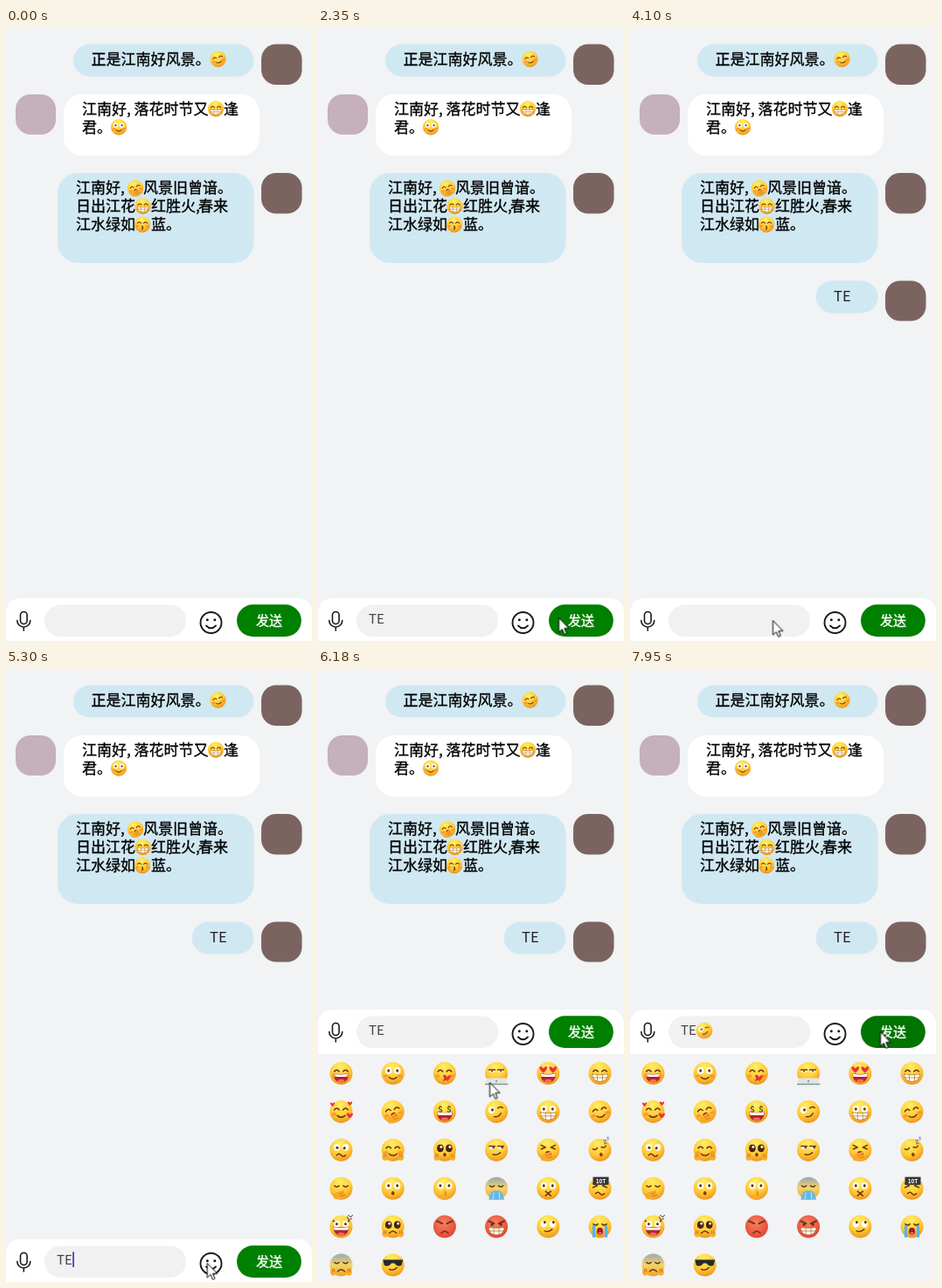
Write an HTML page that moves like this. It is 350 by 702 pixels and loops after 8000 ms.

```html
<!DOCTYPE html>
<html lang="zh">
<head>
<meta charset="utf-8">
<title>Chat</title>
<style>
html, body { margin: 0; width: 100%; height: 100%; overflow: hidden; background: #f1f3f5; }
svg { display: block; }
text { font-family: "Noto Sans CJK SC", "Noto Sans CJK", "Noto Sans", sans-serif; }
.chat text { font-size: 17px; }
.chat .sent text { font-size: 16.5px; fill: #222; }
#lines > text { stroke: #000; stroke-width: .3px; }
.typed text { font-size: 15px; fill: #444; }
.label { font-size: 15px; fill: #fff; stroke: #fff; stroke-width: .4px; }
.mine { fill: #d0e8f2; }
.icon { fill: none; stroke: #1b1b1b; stroke-linecap: round; }

/* One loop is 8 s, so 1% is 80 ms. */
.bar, .one, .two, .picked, .caret, .sent, .button, .grid, .mouse {
  animation-duration: 8s; animation-iteration-count: infinite; animation-timing-function: step-end;
}
.bar { animation-name: lift; }
.one { animation-name: one; }
.two { animation-name: two; }
.picked { animation-name: picked; }
.caret { animation-name: caret; }
.sent { animation-name: sent; }
.button { fill: #008000; animation-name: press; }
.grid { animation-name: zoom; transform-origin: 174.5px 572px; }
.mouse { animation-name: mouse; animation-timing-function: ease-in-out; }

@keyframes lift {
  0% { transform: none; }
  69.625%, 100% { transform: translateY(-263px); }
}
@keyframes one {
  0%, 18.25%, 60.5%, 100% { opacity: 0; }
  15.75%, 57.875% { opacity: 1; }
}
@keyframes two {
  0%, 32% { opacity: 0; }
  18.25%, 60.5%, 100% { opacity: 1; }
}
@keyframes picked {
  0% { opacity: 0; }
  87.25%, 100% { opacity: 1; }
}
@keyframes sent {
  0% { opacity: 0; }
  32%, 100% { opacity: 1; }
}
@keyframes press {
  0%, 33.625% { fill: #008000; }
  31%, 98.25%, 100% { fill: #007300; }
}
@keyframes caret {
  0%, 24.875%, 38.75%, 51.25%, 67.125%, 100% { opacity: 0; transform: none; }
  10.75%, 32%, 45.375%, 54.625% { opacity: 1; transform: none; }
  15.75%, 57.875% { opacity: 1; transform: translateX(9px); }
  18.25%, 60.5% { opacity: 1; transform: translateX(18px); }
}
@keyframes zoom {
  0% { opacity: 0; transform: scale(.9); }
  69.625% { opacity: 0; transform: scale(.9); animation-timing-function: ease-in-out; }
  75.875%, 100% { opacity: 1; transform: none; }
}
@keyframes mouse {
  0% { opacity: 0; transform: translate(150px, 702px); animation-timing-function: step-end; }
  4.875% { opacity: 1; transform: translate(150px, 698px); animation-timing-function: ease-out; }
  8.25%, 20.75% { opacity: 1; transform: translate(133.5px, 676.5px); }
  29.375%, 44.6% { opacity: 1; transform: translate(275.5px, 675.5px); }
  51.25%, 60.5% { opacity: 1; transform: translate(163.5px, 678.5px); }
  67.125%, 69.625% { opacity: 1; transform: translate(232.5px, 680.5px); animation-timing-function: ease-in; }
  71.375% { opacity: 1; transform: translate(221.5px, 621.5px); animation-timing-function: ease-out; }
  77.25% { opacity: 1; transform: translate(196.5px, 473.5px); }
  79% { opacity: 1; transform: translate(195px, 469.5px); }
  84.75%, 87.25% { opacity: 1; transform: translate(196.5px, 500.5px); }
  95%, 100% { opacity: 1; transform: translate(286.5px, 415.5px); }
}
</style>
</head>
<body>
<svg width="350" height="702" viewBox="0 0 350 702">
  <defs>
    <radialGradient id="yellow" cx=".45" cy=".22" r=".85">
      <stop offset="0" stop-color="#ffee66"/><stop offset=".55" stop-color="#ffcb36"/><stop offset="1" stop-color="#ea8a18"/>
    </radialGradient>
    <radialGradient id="red" cx=".45" cy=".35" r=".75">
      <stop offset="0" stop-color="#f98263"/><stop offset="1" stop-color="#dd3d2c"/>
    </radialGradient>
    <linearGradient id="pale" x2="0" y2="1">
      <stop offset=".1" stop-color="#a9b0a6"/><stop offset=".5" stop-color="#f3d468"/><stop offset="1" stop-color="#efa32a"/>
    </linearGradient>
  </defs>

  <g class="chat">
    <rect class="mine" x="77" y="18.5" width="206.5" height="37" rx="18.5"/>
    <rect x="66" y="76" width="224" height="70" rx="21" fill="#fff"/>
    <rect class="mine" x="59" y="166" width="224.5" height="103" rx="23"/>
    <rect x="11" y="76" width="46" height="46" rx="17" fill="#c5b0bc"/>
    <g fill="#7b6460">
      <rect x="292" y="18.5" width="46.5" height="46.5" rx="17"/>
      <rect x="292" y="166" width="46.5" height="46.5" rx="17"/>
    </g>
    <g id="lines"></g>
    <g class="sent">
      <rect class="mine" x="212.5" y="289.5" width="71" height="37" rx="18.5"/>
      <rect x="292" y="289.5" width="46.5" height="46" rx="17" fill="#7b6460"/>
      <text x="233" y="313">TE</text>
    </g>
  </g>

  <g class="grid" id="grid"></g>

  <g class="bar">
    <path d="M0 704V671Q0 653 18 653H332Q350 653 350 671V704Z" fill="#fff"/>
    <g class="icon" stroke-width="1.6">
      <rect x="16.5" y="668.5" width="7.6" height="14" rx="3.8"/>
      <path d="M12.8 678.5a7.5 7.5 0 0 0 15 0M20.3 686.5v3.5"/>
    </g>
    <rect x="44" y="660.5" width="162" height="36.5" rx="18.2" fill="#f1f1f1"/>
    <g class="typed">
      <text class="one" x="58" y="681.5">T</text>
      <text class="two" x="58" y="681.5">TE</text>
      <g class="picked" id="picked"></g>
    </g>
    <rect class="caret" x="58.3" y="667.5" width="1.5" height="17.5" fill="#2a20a8"/>
    <g class="icon" stroke-width="1.9">
      <circle cx="234.5" cy="681" r="12"/>
      <path d="M229 684.5q5.5 5.6 11 0"/>
      <path d="M230.3 677.8h.01M238.8 677.8h.01" stroke-width="3"/>
    </g>
    <rect class="button" x="264" y="660.3" width="73.8" height="36.7" rx="18.3"/>
    <text class="label" x="286" y="684">发送</text>
  </g>

  <path class="mouse" d="M0 0V16.5L3.8 13L6.3 18.8L8.8 17.7L6.4 12H11.5Z" fill="#fff" stroke="#000"/>
</svg>
<script>
const INK = '#6a3412';
const line = (d, color = INK, width = 1.5) =>
  `<path d="${d}" fill="none" stroke="${color}" stroke-width="${width}" stroke-linecap="round" stroke-linejoin="round"/>`;
const shape = (d, color) => `<path d="${d}" fill="${color}"/>`;
const oval = (x, y, rx, ry, color) => `<ellipse cx="${x}" cy="${y}" rx="${rx}" ry="${ry}" fill="${color}"/>`;
const pair = draw => draw(-5) + draw(5);
const label = (x, y, size, color, s) =>
  `<text x="${x}" y="${y}" text-anchor="middle" style="font-size:${size}px;font-weight:700;fill:${color}">${s}</text>`;
const heart = (x, y, s) =>
  shape(`M${x} ${y + s}C${x - 2.4 * s} ${y - s} ${x - s} ${y - 2 * s} ${x} ${y - .6 * s}C${x + s} ${y - 2 * s} ${x + 2.4 * s} ${y - s} ${x} ${y + s}`, '#f0303c');
const eyeball = (x, dx, dy) => oval(x, -3, 3.6, 3.9, '#fff') + oval(x + dx, -3 + dy, 1.5, 1.7, INK);

// Parts of a face with radius 13 around the origin.
const parts = {
  dots: pair(x => oval(x, -2.5, 1.6, 2, INK)),
  arcs: pair(x => line(`M${x - 2.8} -2q2.8 -3.6 5.6 0`)),
  shut: pair(x => line(`M${x - 2.6} -3q2.6 2.6 5.2 0`)),
  squint: line('M-8 -5.5L-3 -3L-8 -1M8 -5.5L3 -3L8 -1'),
  tired: pair(x => oval(x, -3, 3.2, 2.2, '#fff') + line(`M${x - 3.4} -4h6.8`) + oval(x, -2.4, 1, 1, INK)),
  wide: pair(x => eyeball(x, 0, 0)),
  up: pair(x => eyeball(x, 1, -2)),
  side: pair(x => oval(x, -3, 3.3, 2.3, '#fff') + line(`M${x - 3.3} -4.4h6.6`) + oval(x + 1.6, -2.8, 1.3, 1.4, INK)),
  odd: eyeball(-5, .5, .5) + eyeball(5, -1.3, 1),
  plead: pair(x => oval(x, -2, 3.8, 4.4, '#4a2410') + oval(x + 1, -3.6, 1.4, 1.5, '#fff')),
  wink: eyeball(-5, 1, 0) + line('M2.5 -3.5q3 -2 5.5 1'),
  hearts: pair(x => heart(x * 1.1, -3.5, 3.3)),
  money: pair(x => label(x, 1, 10, '#4c5b22', '$')),
  shades: shape('M-11.5 -6H11.5L10 0Q6 3.5 1.5 -2H-1.5Q-6 3.5 -10 0Z', '#26282c'),
  brows: line('M-9 -6.5L-2.5 -3.5M9 -6.5L2.5 -3.5', INK, 1.8),
  smile: line('M-4.5 4.5q4.5 4 9 0'),
  smirk: line('M-4 5q5 2 8.5 -2'),
  laugh: shape('M-9 0Q0 2 9 0Q8.5 10.5 0 10.5T-9 0', '#b5232b') + shape('M-8.6 .4Q0 2.4 8.6 .4L7.8 4H-7.8Z', '#fff') + oval(0, 8.4, 4, 1.7, '#f46a64'),
  teeth: shape('M-9 1Q0 2.5 9 1Q8.5 9.5 0 9.5T-9 1', '#fff') + line('M-9 1Q0 2.5 9 1Q8.5 9.5 0 9.5T-9 1M-8 5H8M-3 2V9M3 2V9', '#a96a22', .7),
  open: oval(0, 5.5, 3.6, 4.4, '#a12028') + oval(0, 7.6, 2.3, 1.5, '#f46a64'),
  little: oval(0, 5.5, 1.8, 2.2, '#8c3717'),
  frown: line('M-4 7.5q4 -4.5 8 0'),
  wave: line('M-5 6q2.5 -3 5 0t5 0'),
  kiss: line('M-1 2.5q3.4 1 .5 2.6q3.4 1 -.5 2.8'),
  cross: line('M-3 3.5l6 5M3 3.5l-6 5'),
  blush: pair(x => oval(x * 1.6, 3, 2.6, 1.8, '#ff7a3caa')),
  love: heart(3, 6, 3),
  halo: heart(-10, -8, 2) + heart(10, 5, 2.6) + heart(10, -9, 2),
  laptop: shape('M-11 5.5H11L13 13H-13Z', '#dfe5e6') + line('M-12.5 12.6H12.5', '#7f9a92') + oval(0, 9, 1.3, 1.3, '#8fa3a6'),
  hand: shape('M-8 12Q-9 5 -4 4L3 2Q5 3 2 5Q7 6 5 10Q1 14 -8 12', '#f7a928') + line('M2 5L-2 6.5M4 8L-1 9', '#bd721b', .8),
  hands: pair(x => oval(x * 1.8, 8, 3.4, 4.2, '#f8b02d') + line(`M${x * 1.8 - 1} 5v3M${x * 1.8 + 1} 5v3`, '#bd721b', .8)),
  finger: shape('M-1.5 3Q0 1 1.5 3V8Q6 8 4 13H-4Q-6 9 -1.5 8Z', '#f7a928') + line('M1.5 4V8', '#bd721b', .8),
  sleep: label(8, -5, 9, '#78879b', 'z') + label(12, -9, 6, '#78879b', 'z'),
  tears: pair(x => line(`M${x * 1.4} 0V11`, '#51b6ee', 3.4)),
  sick: shape('M-6 4Q0 1 6 4L9 13H-9Z', '#65b8e4') + line('M-3 5L-4 12M3 5L4 12', '#c2e8f8', 1),
  weight: shape('M-8 -13H10V-4H-8Z', '#333537') + label(1, -6, 6.5, '#fff', '10T'),
  veins: line('M7 -11l2 3l3 -1M8 -13l3 2l2 -2', '#6b5340', 1.1)
};

function emoji(spec, x, y, radius = 13) {
  const names = spec.split(' ');
  const skin = ['red', 'pale'].find(name => names.includes(name)) || 'yellow';
  const turn = names.includes('tilt') ? -14 : 0;
  return `<g transform="translate(${x} ${y}) rotate(${turn}) scale(${radius / 13})"><circle r="13" fill="url(#${skin})"/>`
    + names.map(name => parts[name] || '').join('') + '</g>';
}

const faces = [
  'arcs laugh blush', 'wide smile blush', 'arcs kiss blush love', 'tired laptop', 'hearts laugh', 'arcs teeth',
  'arcs smile blush halo', 'tilt arcs open blush hand', 'money laugh', 'tilt wink smirk', 'wide teeth', 'tilt arcs smile blush',
  'odd wave', 'arcs smile blush hands', 'plead little hands', 'side smirk', 'squint open hand', 'tilt shut little sleep',
  'shut frown hand', 'wide little', 'wide finger', 'pale shut sick', 'wide cross', 'squint wave weight',
  'brows wide laugh veins', 'plead frown hands', 'red brows frown', 'red brows dots teeth', 'up smirk', 'shut open tears',
  'pale shut frown hands', 'shades smirk'
];
const fill = (id, html) => { document.getElementById(id).innerHTML = html; };

fill('grid', faces.map((face, i) =>
  emoji(face, 26.5 + 59.2 * (i % 6), 463 + 43.9 * Math.floor(i / 6))).join(''));
fill('picked', emoji('tilt wink smirk', 85, 677, 9.3));

const runs = [
  [97.5, 42, '正是江南好风景。'],
  [87, 98.5, '江南好,'], [146.5, 98.5, '落花时节又'], [249, 98.5, '逢'],
  [87, 119.5, '君。'],
  [80, 189, '江南好,'], [157, 189, '风景旧曾谙。'],
  [80, 210, '日出江花'], [166, 210, '红胜火,'], [220, 210, '春来'],
  [80, 231, '江水绿如'], [166, 231, '蓝。']
];
const inline = [
  [11, 242.5, 35.5], [5, 240, 92.5], [1, 129, 113.5], [7, 148, 183.5], [5, 156.5, 204], [2, 156, 225]
];
fill('lines', runs.map(([x, y, s]) => `<text x="${x}" y="${y}">${s}</text>`).join('')
  + inline.map(([i, x, y]) => emoji(faces[i].replace(' love', ''), x, y, 9.2)).join(''));
</script>
</body>
</html>
```
